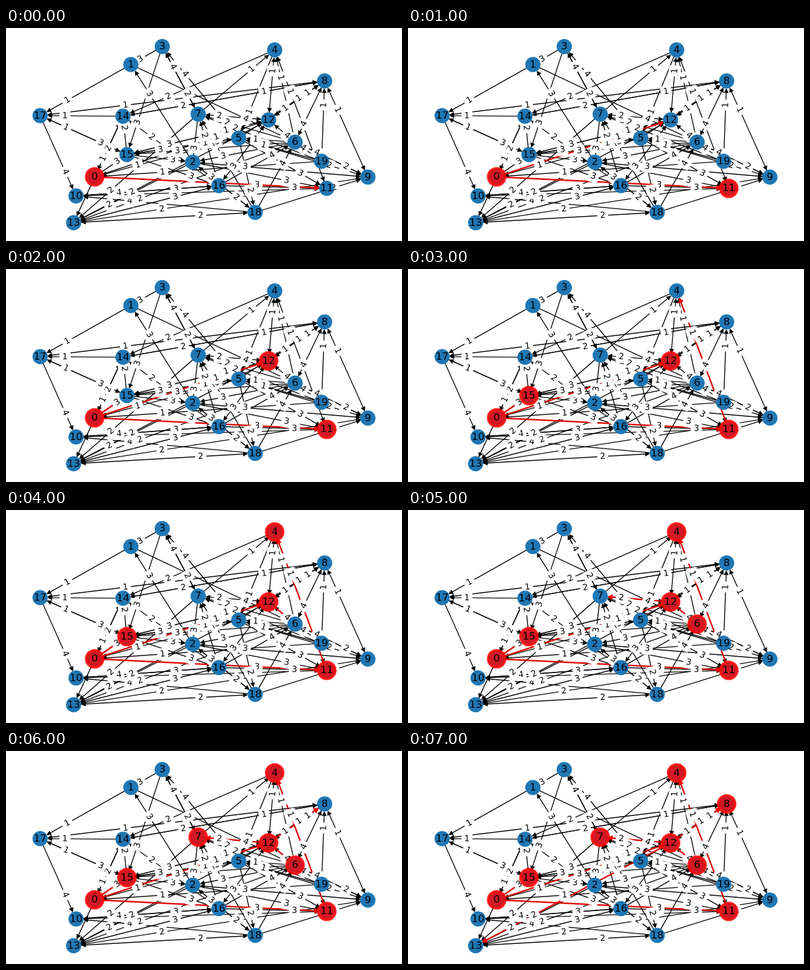
These frames come from a looping animation (650x350 px, 8000 ms). An HTML page with a canvas:

```html
<!DOCTYPE html>
<html lang="en">
<head>
<meta charset="utf-8">
<title>Breadth-first search</title>
<style>
  html, body { margin: 0; width: 100%; height: 100%; overflow: hidden; background: #fff; }
  canvas { display: block; }
</style>
</head>
<body>
<canvas id="stage" width="650" height="350"></canvas>
<script>
const ctx = document.getElementById('stage').getContext('2d');
const STEP = 1000, STEPS = 8, RADIUS = 12, LABEL_AT = .7;
const BLACK = '#000', WHITE = '#fff', BLUE = '#1f77b4', RED = 'rgba(255,0,0,.8)';

// Place, weight of every incoming edge, and where those edges start.
const node = (x, y, weight, ...from) => ({ x, y, weight, from });
const nodes = [
  node(145.5, 244.5, 1, 5, 14, 19),
  node(205, 60, 3, 2, 3),
  node(306.5, 220.5, 3, 6, 7, 9, 15, 18),
  node(256.5, 30.5, 4, 5, 7),
  node(441, 36, 1, 6, 7, 11, 12),
  node(382, 181, 1, 4, 6, 15, 19),
  node(474.5, 187.5, 4, 1, 8, 9, 12, 16, 18, 19),
  node(315.5, 141.5, 2, 3, 6, 12, 16, 18, 19),
  node(523, 87, 1, 5, 9, 12, 14, 19),
  node(594, 245, 2, 5, 6, 18),
  node(115, 276, 4, 16, 17, 18),
  node(526.5, 263.5, 3, 0, 2, 5, 10, 16),
  node(431, 151, 1, 0, 8, 15),
  node(111, 320, 2, 2, 6, 7, 9, 12),
  node(192, 145, 2, 4, 8, 13, 15, 16),
  node(198.5, 208, 3, 0, 3, 5, 6, 12, 17),
  node(349.5, 259, 3, 10, 12, 13, 15),
  node(56, 144, 1, 1, 8, 14, 15),
  node(409, 303, 2, 2, 5, 13),
  node(518, 219, 2)
];
const isHub = i => i >= 8 && i <= 13;   // their outgoing edges run both ways

const edges = nodes.flatMap(to =>
  to.from.map(i => ({ from: nodes[i], to, both: isHub(i) })));

// Breadth-first search gives the order of the red nodes and edges.
const visited = [nodes[0]], followed = [];
for (const from of visited) {
  for (const edge of edges) {
    if (edge.from !== from || visited.includes(edge.to)) continue;
    visited.push(edge.to);
    followed.push(edge);
  }
}

function arrow({ from, to, both }, color, width) {
  const dx = to.x - from.x, dy = to.y - from.y;
  const end = Math.hypot(dx, dy) - RADIUS;
  const head = (tip, back) => {
    ctx.beginPath();
    ctx.moveTo(tip, 0);
    ctx.lineTo(back, 2.8);
    ctx.lineTo(back, -2.8);
    ctx.closePath();
    ctx.fill();
    ctx.stroke();
  };
  ctx.save();
  ctx.translate(from.x, from.y);
  ctx.rotate(Math.atan2(dy, dx));
  ctx.strokeStyle = ctx.fillStyle = color;
  ctx.lineWidth = width;
  ctx.beginPath();
  ctx.moveTo(RADIUS, 0);
  ctx.lineTo(end - 2, 0);
  ctx.stroke();
  head(end - 1.5, end - 7);
  if (both) head(RADIUS + 1.5, RADIUS + 7);
  ctx.restore();
}

function write(text, x, y, size) {
  ctx.font = `${size}px "DejaVu Sans", sans-serif`;
  ctx.textAlign = 'center';
  ctx.fillStyle = BLACK;
  ctx.fillText(text, x, y + size * .28);
}

function weightLabel({ from, to }) {
  const dx = to.x - from.x, dy = to.y - from.y;
  ctx.save();
  ctx.translate(from.x + LABEL_AT * dx, from.y + LABEL_AT * dy);
  ctx.rotate(Math.atan(dy / dx));
  ctx.fillStyle = WHITE;
  ctx.beginPath();
  ctx.roundRect(-9, -10, 18, 20, 4);
  ctx.fill();
  write(to.weight, 0, 0, 13.9);
  ctx.restore();
}

function disc({ x, y }, radius, color, rim = 0) {
  ctx.fillStyle = ctx.strokeStyle = color;
  ctx.lineWidth = rim;
  ctx.beginPath();
  ctx.arc(x, y, radius, 0, 2 * Math.PI);
  ctx.fill();
  if (rim) ctx.stroke();
}

function draw(step) {
  ctx.fillStyle = WHITE;
  ctx.fillRect(0, 0, 650, 350);
  edges.forEach(edge => arrow(edge, BLACK, 1.39));
  followed.slice(0, step + 1).forEach(edge => arrow({ ...edge, both: false }, RED, 2.6));
  edges.forEach(weightLabel);
  nodes.forEach(n => disc(n, RADIUS + .5, BLUE));
  visited.slice(0, step + 1).forEach(n => disc(n, 14.3, RED, 3.6));
  nodes.forEach(({ x, y }, i) => write(i, x, y, 16.7));
}

const start = performance.now();
function tick() {
  draw(Math.floor((performance.now() - start) / STEP) % STEPS);
  requestAnimationFrame(tick);
}
tick();
</script>
</body>
</html>
```
